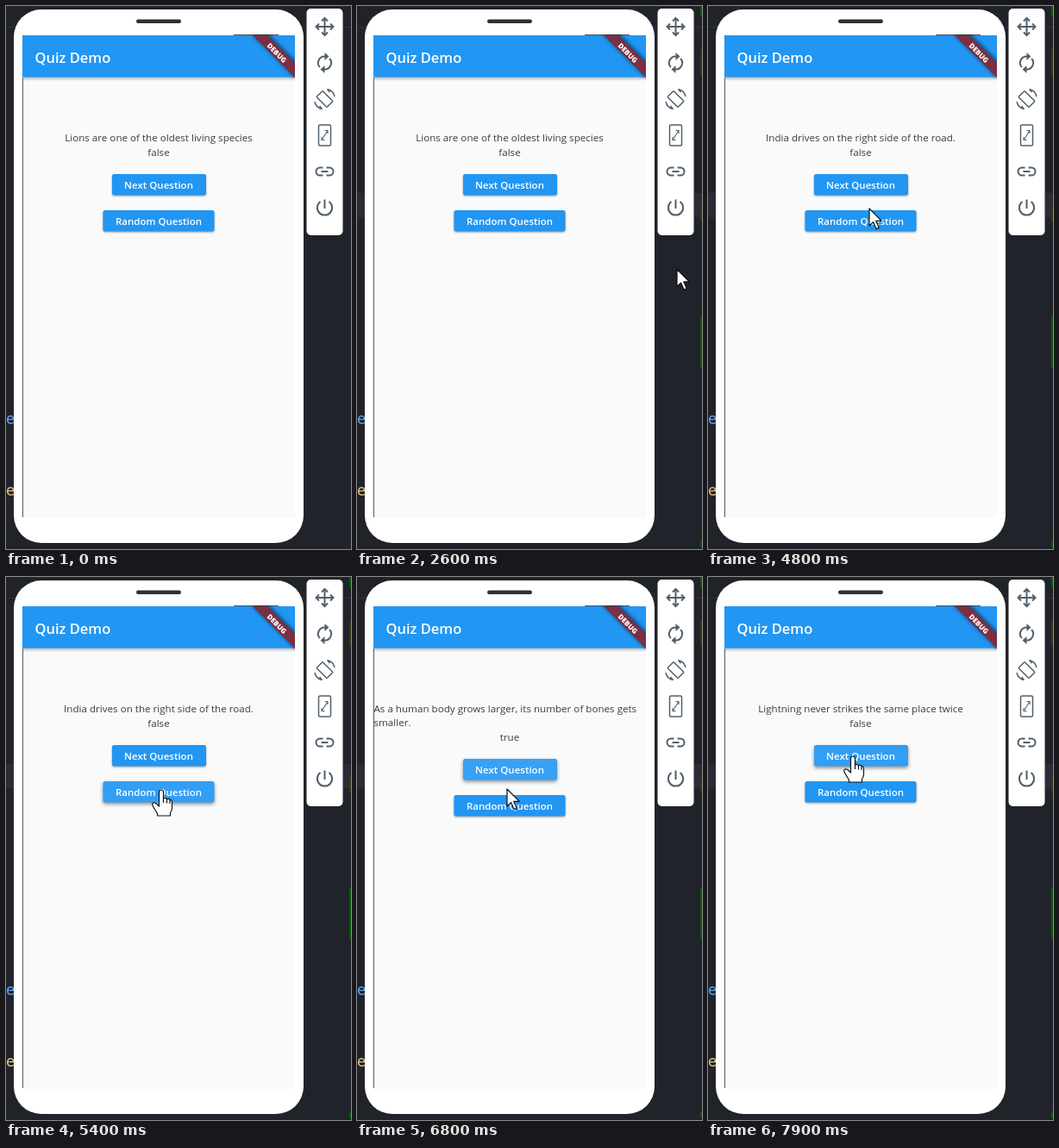
Write an HTML page that moves like this. It is 400 by 630 pixels and loops after 8 s.

```html
<!DOCTYPE html>
<html lang="en">
<head>
<meta charset="utf-8">
<title>Quiz Demo</title>
<style>
html, body { margin: 0; width: 400px; height: 630px; overflow: hidden; background: #202329; }
svg { display: block; font-family: "Open Sans", "Noto Sans", sans-serif; }
.code { font: 17px "DejaVu Sans Mono", monospace; }
.body { font-size: 11.62px; fill: #3c3c3c; }
.mid { text-anchor: middle; }
.label { font-size: 11.5px; font-weight: 600; fill: #fff; text-anchor: middle; }
.icon { fill: none; stroke: #51606a; stroke-width: 2; }
.up { filter: drop-shadow(0 1px 1px rgba(0,0,0,.4)); }
.up.high { filter: drop-shadow(0 2px 2px rgba(0,0,0,.45)); }
</style>
</head>
<body>
<svg width="400" height="630" viewBox="0 0 400 630">
  <defs>
    <linearGradient id="shade" x2="0" y2="1">
      <stop stop-color="#000" stop-opacity=".3"/>
      <stop offset="1" stop-color="#000" stop-opacity="0"/>
    </linearGradient>
    <clipPath id="bar"><rect x="19" y="33" width="316" height="51"/></clipPath>
    <filter id="blur"><feGaussianBlur stdDeviation="2"/></filter>
  </defs>

  <rect width="400" height="630" fill="#202329"/>
  <path d="M0 24.5H400" stroke="#30333b"/>
  <g id="edge">
    <path d="M0 217H9V245H0ZM391 217H400V245H391Z" fill="#2a2d35"/>
    <path d="M398 0h2v12h-2zM398 360h2v60h-2zM398 620h2v8h-2z" fill="#075c08"/>
    <path d="M398 50h2v30h-2zM398 232h2v18h-2z" fill="#333a12"/>
  </g>
  <text class="code" x="0" y="485" fill="#61a5ef">e</text>
  <text class="code" x="0" y="568" fill="#e2c27c">e</text>

  <rect x="9" y="4" width="336" height="619" rx="32" fill="#fff"/>
  <rect x="151" y="15.5" width="52" height="4.5" rx="2.2" fill="#303033"/>
  <rect x="19" y="34" width="316" height="560" fill="#fafafa"/>
  <path d="M19.5 83V593" stroke="#55585c"/>
  <rect x="20" y="82" width="315" height="5" fill="url(#shade)"/>
  <rect x="19" y="34" width="316" height="48.5" fill="#2196f3"/>
  <path d="M264 33.5H316" stroke="#45525f"/>
  <text x="33.5" y="65.5" font-size="16.5" font-weight="600" fill="#fff">Quiz Demo</text>
  <g clip-path="url(#bar)">
    <path d="M284 32H304L337 65V85Z" fill="#000" opacity=".5" filter="url(#blur)"/>
    <path d="M286 34H303L335 66V83Z" fill="#7c2f42"/>
    <text class="mid" transform="translate(314 54.5) rotate(45)" y="3" font-size="8.2" font-weight="800" fill="#fff">DEBUG</text>
  </g>

  <text id="line1" class="body" y="157"></text>
  <text id="line2" class="body" x="19.5" y="173"></text>
  <g id="lower">
    <text id="answer" class="body mid" x="177" y="174"></text>
    <g id="buttons"></g>
  </g>

  <rect x="348.5" y="3" width="42" height="263" rx="5" fill="#fff"/>
  <g class="icon">
    <g transform="translate(369.5 24)">
      <path d="M-9 0H9M0-9V9"/>
      <path d="M-3.5-6.5 0-10 3.5-6.5M-3.5 6.5 0 10 3.5 6.5M-6.5-3.5-10 0-6.5 3.5M6.5-3.5 10 0 6.5 3.5"/>
    </g>
    <g transform="translate(369.5 66)">
      <path d="M-5.6 5A7.5 7.5 0 0 1 1-7.5M5.6-5A7.5 7.5 0 0 1-1 7.5"/>
      <path d="M0-12 5-7.5 0-3ZM0 12-5 7.5 0 3Z" fill="#51606a" stroke="none"/>
    </g>
    <g transform="translate(369.5 108)" stroke-width="1.5">
      <rect x="-5" y="-8.5" width="10" height="17" rx="1" transform="rotate(-45)"/>
      <path d="M3-11.5Q10-10 11.5-3M-3 11.5Q-10 10-11.5 3M3-11.5 6-8M-3 11.5-6 8"/>
    </g>
    <g transform="translate(369.5 150)" stroke-width="1.5">
      <rect x="-7" y="-12" width="14" height="24" rx="1.5"/>
      <path d="M-3.5 5.5 3.5-5.5M0-5.5H3.5V-2M-3.5 2V5.5H0" stroke-width="1.1"/>
    </g>
    <path transform="translate(369.5 192)" d="M-2-4.5H-5.5A4.5 4.5 0 0 0-5.5 4.5H-2M2-4.5H5.5A4.5 4.5 0 0 1 5.5 4.5H2M-4 0H4"/>
    <path transform="translate(369.5 234)" d="M0-9.5V1M-5-7A8.6 8.6 0 1 0 5-7"/>
  </g>

  <g id="cursor" fill="#fff" stroke="#111" stroke-width="1.2" stroke-linejoin="round">
    <path id="arrow" d="M0 0V20l4.6-4.4 3.4 8 3.2-1.4-3.4-7.8h6.4Z"/>
    <path id="hand" d="M-2.5 2.5Q-2.5 0 0 0T2.5 2.5V10q2.5-1.5 4 .8q2.5-1.2 3.5 1q2.5-.6 2.5 2.5V21q0 3-2 5.5V30H-4.5V27.5q-2.5-4-4.8-8q-2-3.5 .2-4.5q2-.8 4 1.5l2.6 2.5ZM2.5 10v5M6.5 11v4.5M10 12v4"/>
  </g>
</svg>
<script>
const LOOP = 8000, STEP = 100;
const $ = id => document.getElementById(id);

const questions = [
  [0, "Lions are one of the oldest living species", "", "false"],
  [3900, "India drives on the right side of the road.", "", "false"],
  [5900, "Lunar Fork was made in India", "", "false"],
  [6500, "As a human body grows larger, its number of bones gets", "smaller.", "true"],
  [7400, "Lightning never strikes the same place twice", "", "false"]
];

// time, x, y of the pointer tip
const path = [
  [2500, 398, 320], [2900, 290, 262], [3300, 206, 228], [3400, 192, 213],
  [3600, 184, 203], [4500, 184, 204], [4800, 187, 235], [5000, 183, 249],
  [5400, 180, 247], [5700, 175, 205], [5900, 174.5, 198], [6200, 174.5, 199],
  [6500, 174, 206], [6800, 174, 246], [7000, 172, 260], [7400, 172, 259],
  [7700, 169, 222], [7900, 168, 208]
];

// press time, button index
const presses = [[3800, 0], [5800, 0], [6400, 0], [7300, 1]];

const buttons = [
  { x: 123, y: 195, w: 109, h: 24.5, text: "Next Question" },
  { x: 112.5, y: 237, w: 129, h: 24.5, text: "Random Question" }
];

buttons.forEach((b, i) => {
  const box = `x="${b.x}" y="${b.y}" width="${b.w}" height="${b.h}" rx="2.5"`;
  $("buttons").insertAdjacentHTML("beforeend", `
    <clipPath id="clip${i}"><rect ${box}/></clipPath>
    <rect id="face${i}" class="up" ${box} fill="#2196f3"/>
    <rect id="glow${i}" ${box} fill="#fff" opacity="0"/>
    <g clip-path="url(#clip${i})"><circle id="ripple${i}" fill="#fff"/></g>
    <text class="label" x="177" y="${b.y + 17}">${b.text}</text>`);
});

function pointer(t) {
  if (t < path[0][0]) return null;
  const i = path.findIndex(p => p[0] > t);
  if (i < 0) return path[path.length - 1].slice(1);
  const a = path[i - 1], b = path[i], k = (t - a[0]) / (b[0] - a[0]);
  return [a[1] + (b[1] - a[1]) * k, a[2] + (b[2] - a[2]) * k];
}

const latest = (list, t) => list.filter(e => e[0] <= t).pop();

function draw(t) {
  const [, first, second, answer] = latest(questions, t);
  const shift = second ? 16 : 0;
  const tip = pointer(t);
  $("line1").textContent = first;
  $("line1").setAttribute("x", second ? 19.5 : 177);
  $("line1").setAttribute("text-anchor", second ? "start" : "middle");
  $("line2").textContent = second;
  $("answer").textContent = answer;
  $("lower").setAttribute("transform", `translate(0 ${shift})`);
  $("edge").style.opacity = t < 300 ? 0 : 1;

  let over = false;
  buttons.forEach((b, i) => {
    const hover = !!tip && tip[0] >= b.x && tip[0] <= b.x + b.w &&
      tip[1] >= b.y + shift && tip[1] <= b.y + shift + b.h;
    const press = latest(presses.filter(p => p[1] === i), t);
    const age = press ? t - press[0] : LOOP;
    const live = age < 500;
    over = over || hover;
    $("glow" + i).setAttribute("opacity", hover ? 0.08 : 0);
    $("face" + i).classList.toggle("high", hover || live);
    const ripple = $("ripple" + i);
    ripple.setAttribute("r", live ? 10 + 0.205 * age : 0);
    if (!live) return;
    const [x, y] = pointer(press[0]);
    ripple.setAttribute("cx", x + 2);
    ripple.setAttribute("cy", Math.min(y, b.y + b.h));
    ripple.setAttribute("opacity", 0.25 * Math.min(1, (500 - age) / 250));
  });

  $("cursor").style.display = tip ? "" : "none";
  if (tip) $("cursor").setAttribute("transform", `translate(${tip})`);
  $("hand").style.display = over ? "" : "none";
  $("arrow").style.display = over ? "none" : "";
}

const start = performance.now();
function tick() {
  const t = (performance.now() - start) % LOOP;
  draw(Math.floor(t / STEP) * STEP);
  requestAnimationFrame(tick);
}
tick();
</script>
</body>
</html>
```
